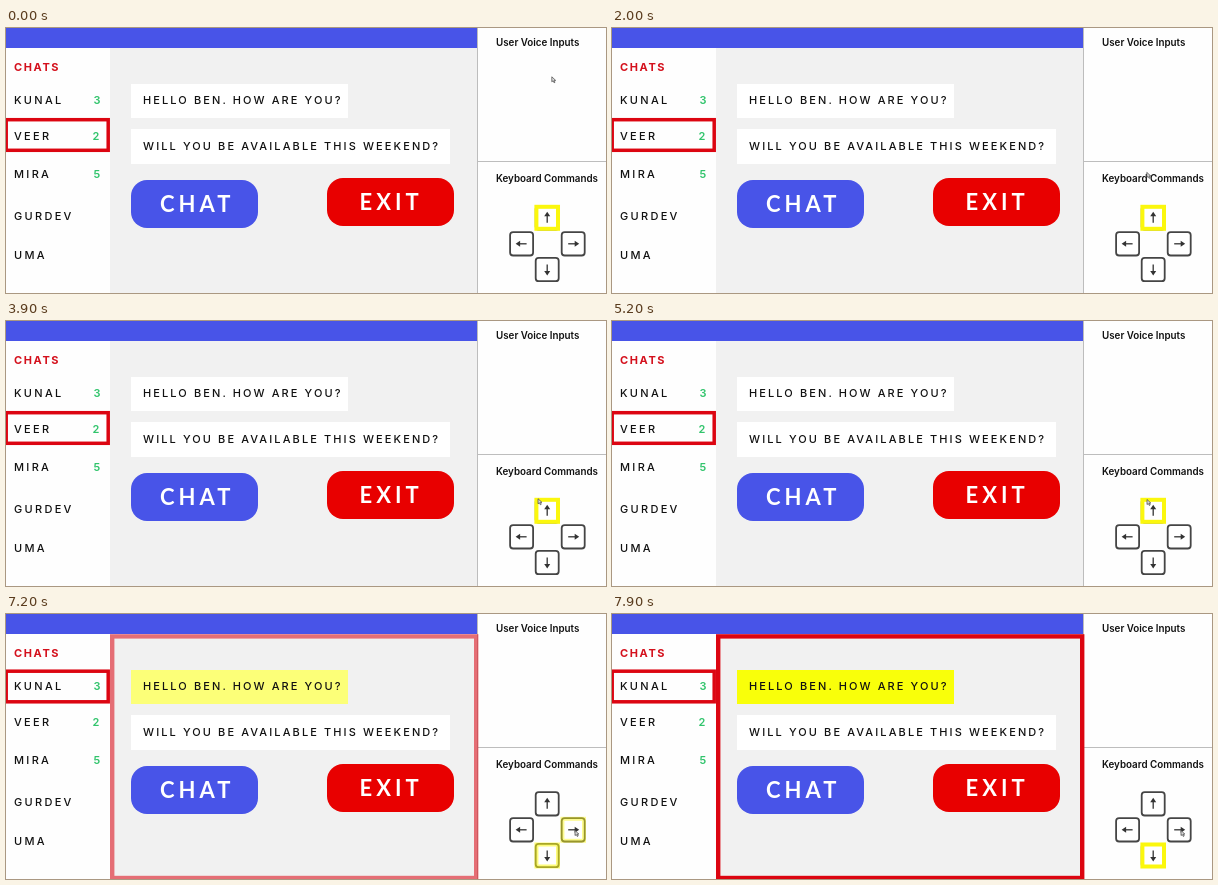
These frames come from a looping animation (600 by 265 pixels, 8000 ms). An HTML page:

```html
<!DOCTYPE html>
<html lang="en">
<head>
<meta charset="utf-8">
<title>Chat navigation</title>
<style>
html, body { margin: 0; width: 100%; height: 100%; overflow: hidden; background: #fefefe; }
svg { display: block; width: 600px; height: 265px; }
text { font: 500 11px Inter, sans-serif; fill: #111; white-space: pre; }
.name { letter-spacing: 2.3px; }
.head { font-weight: 700; letter-spacing: 1.6px; fill: #d4101c; }
.count { font-weight: 600; fill: #31c46c; }
.message { letter-spacing: 2.1px; }
.title { font-weight: 600; font-size: 9.8px; }
.button { font: 700 22px Lato, sans-serif; letter-spacing: 4px; fill: #fff; }
.focus { fill: none; stroke: #dc0511; stroke-width: 3.5; }
.lit { fill: none; stroke: #fbf70d; stroke-width: 4; }
</style>
</head>
<body>
<svg viewBox="0 0 600 265">
  <defs>
    <g id="key">
      <rect x="-11.5" y="-11.7" width="23" height="23.4" rx="3" fill="#fff" stroke="#454545" stroke-width="1.8"/>
    </g>
    <g id="arrow">
      <path d="M-5 0H3" stroke="#333" stroke-width="1.3"/>
      <path d="M1.5-3L6 0L1.5 3Z" fill="#333"/>
    </g>
    <rect id="ring" class="lit" x="-10.8" y="-11" width="21.6" height="22"/>
  </defs>

  <rect x="104" y="20" width="367" height="245" fill="#f1f1f1"/>
  <rect width="471" height="20" fill="#4854e8"/>
  <path d="M471.5 0V265M471 133.5H600" stroke="#bdbdbd"/>

  <text class="head" x="8" y="43">CHATS</text>
  <g id="people"></g>

  <rect x="125" y="56" width="217" height="34" fill="#fff"/>
  <rect class="second" x="125" y="56" width="217" height="34" fill="#f9ff0a"/>
  <rect x="125" y="101" width="319" height="35" fill="#fff"/>
  <text class="message" x="137" y="76">HELLO BEN. HOW ARE YOU?</text>
  <text class="message" x="137" y="122">WILL YOU BE AVAILABLE THIS WEEKEND?</text>

  <rect x="125" y="152" width="127" height="48" rx="16" fill="#4854e8"/>
  <rect x="321" y="150" width="127" height="48" rx="16" fill="#e80000"/>
  <text class="button" x="154" y="184">CHAT</text>
  <text class="button" x="353.5" y="182">EXIT</text>

  <rect class="focus before" x=".2" y="91.7" width="102" height="30.6"/>
  <rect class="focus first" x=".2" y="57.2" width="102" height="30.6"/>
  <rect class="focus second" x="106.2" y="22.4" width="364" height="241.6" style="stroke-width:4.4"/>

  <text class="title" x="490" y="18">User Voice Inputs</text>
  <text class="title" x="490" y="154">Keyboard Commands</text>
  <g id="keys"></g>
  <use class="before" href="#ring" x="541.2" y="189.8"/>
  <use class="between" href="#ring" x="567.2" y="215.8"/>
  <use class="second" href="#ring" x="541.2" y="241.5"/>

  <path id="cursor" d="M0 0V5L1.3 4L2.3 6L3.2 5.5L2.3 3.6H3.9Z" fill="#ddd" stroke="#444" stroke-width=".7"/>
</svg>
<script>
const LOOP = 8000;
const byId = id => document.getElementById(id);
const clamp = v => Math.min(1, Math.max(0, v));
const smooth = v => v * v * (3 - 2 * v);
const easeOut = v => 1 - (1 - v) ** 2;

// name, baseline, unread count, count x
const people = [
  ['KUNAL', 76, 3, 87.5], ['VEER', 111.5, 2, 86.5], ['MIRA', 150, 5, 87.5],
  ['GURDEV', 192], ['UMA', 231]
];
byId('people').innerHTML = people.map(([name, y, count, x]) =>
  `<text class="name" x="8" y="${y}">${name}</text>` +
  (count ? `<text class="count" x="${x}" y="${y}">${count}</text>` : '')).join('');

// centre x, centre y, arrow angle
const keys = [[541.2, 189.8, -90], [515.6, 215.8, 180], [567.2, 215.8, 0], [541.2, 241.5, 90]];
byId('keys').innerHTML = keys.map(([x, y, angle]) =>
  `<g transform="translate(${x} ${y})"><use href="#key"/><use href="#arrow" transform="rotate(${angle})"/></g>`).join('');

// start, end, target x, target y
const moves = [
  [1500, 2250, 531, 177.5], [3700, 4300, 535, 178.5],
  [5700, 6250, 570.5, 217], [7000, 7150, 569, 216.5]
];

function cursorAt(time) {
  let x = 545.8, y = 48.8;
  for (const [start, end, toX, toY] of moves) {
    const k = smooth(clamp((time - start) / (end - start)));
    x += (toX - x) * k;
    y += (toY - y) * k;
  }
  return [x, y];
}

function fade(name, opacity) {
  document.querySelectorAll('.' + name).forEach(el => el.style.opacity = opacity);
}

function draw(now) {
  const time = now % LOOP;
  const first = easeOut(clamp((time - 5300) / 400));
  const second = easeOut(clamp((time - 7070) / 400));
  fade('before', 1 - first);
  fade('first', first);
  fade('between', first * (1 - second));
  fade('second', second);
  byId('cursor').setAttribute('transform', `translate(${cursorAt(time)})`);
  requestAnimationFrame(draw);
}
requestAnimationFrame(draw);
</script>
</body>
</html>
```
